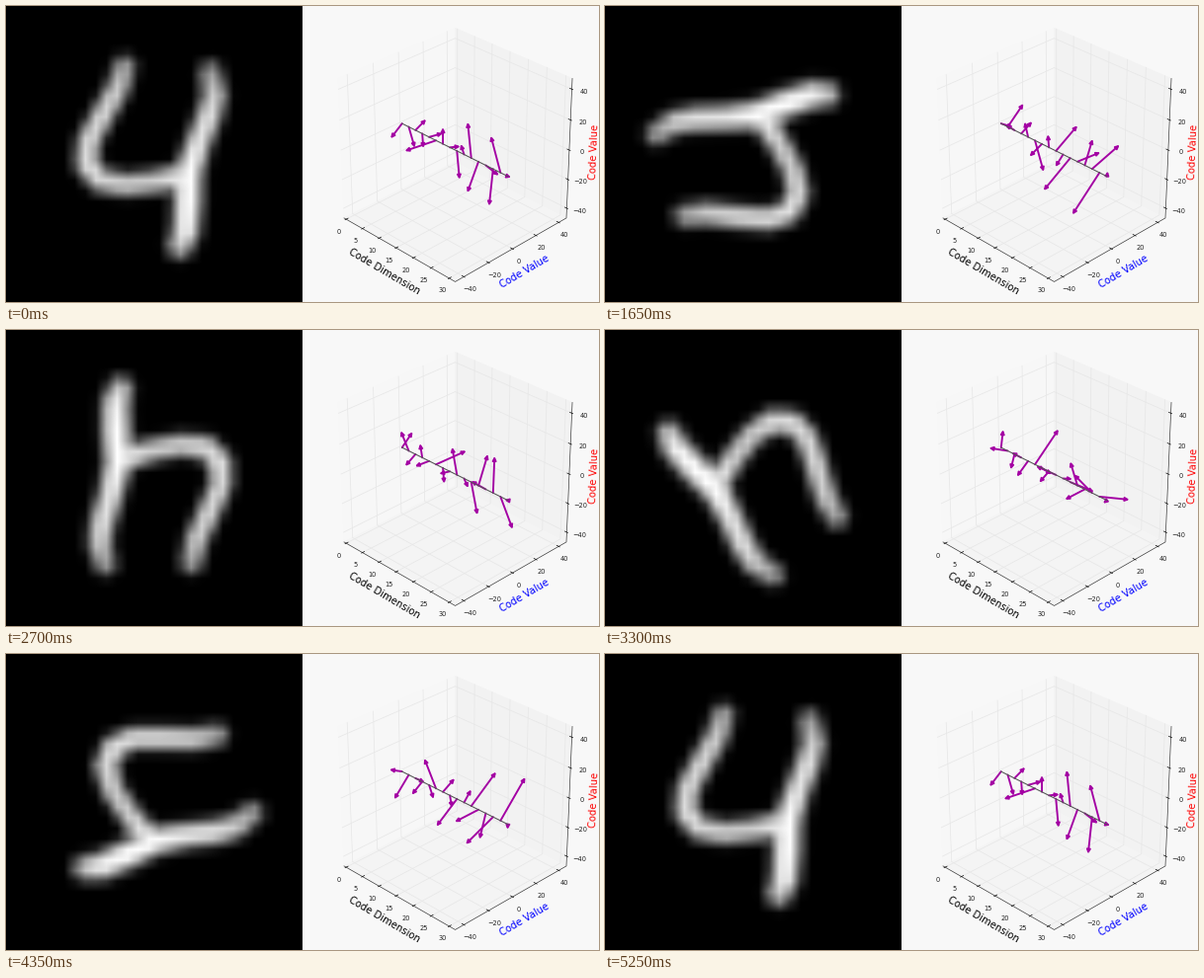
These frames come from a looping animation (600x300 px, 5400 ms). A matplotlib script:

```python
import numpy as np
import matplotlib.pyplot as plt
from matplotlib.animation import FuncAnimation
from matplotlib.patches import FancyArrowPatch, Polygon

FRAMES = 36
BACK = "#f8f8f8"
PURPLE = "#a300a3"
E = 0.5 + 1 / 48      # half size of the padded box

plt.rcParams["font.family"] = "DejaVu Sans"
fig = plt.figure(figsize=(10, 5), dpi=60, facecolor=BACK)
ax = fig.add_axes([0, 0, 1, 1])
ax.set_xlim(0, 600)
ax.set_ylim(300, 0)
ax.axis("off")

# --- 3D box seen from azimuth -45, elevation 30 ---
N = np.array([0.6124, -0.6124, 0.5])
U = np.array([0.7071, 0.7071, 0.0])
V = np.array([-0.3536, 0.3536, 0.866])


def project(p):
    p = np.asarray(p, float)
    s = 1567 / (10 - p @ N)
    return np.stack([454.5 + s * (p @ U), 146 - s * (p @ V)], axis=-1)


def line(pts, color, width, z):
    ax.plot(*project(pts).T, color=color, lw=width, zorder=z)


def dim(d):
    return d / 31 - 0.5


def val(v):
    return v / 90


def tick_label(p, dx, dy, v):
    x, y = project(p)
    text = str(v).replace("-", "\u2212")
    ax.text(x + dx, y + dy, text, size=8, color="#222222",
            ha="center", va="center_baseline")


panes = [
    ([(-E, -E, -E), (-E, E, -E), (-E, E, E), (-E, -E, E)], "#f7f7f7"),
    ([(-E, E, -E), (E, E, -E), (E, E, E), (-E, E, E)], "#f2f2f2"),
    ([(-E, -E, -E), (E, -E, -E), (E, E, -E), (-E, E, -E)], "#f4f4f4"),
]
for corners, color in panes:
    ax.add_patch(Polygon(project(corners), fc=color, ec=color, lw=0.5, zorder=1))

IN, OUT = 0.0175, 0.009
for d in range(0, 31, 5):
    x = dim(d)
    line([(x, -E, -E), (x, E, -E), (x, E, E)], "#e7e7e7", 0.9, 2)
    line([(x, -E - OUT, -E), (x, -E + IN, -E)], "k", 0.8, 4)
    tick_label((x, -E, -E), -7, 12, d)
for v in range(-40, 41, 20):
    t = val(v)
    line([(E, t, -E), (-E, t, -E), (-E, t, E)], "#e7e7e7", 0.9, 2)
    line([(-E, -E, t), (-E, E, t), (E, E, t)], "#e7e7e7", 0.9, 2)
    line([(E + OUT, t, -E), (E - IN, t, -E)], "k", 0.8, 4)
    line([(E + OUT, E, t), (E - IN, E, t)], "k", 0.8, 4)
    tick_label((E, t, -E), 6, 12, v)
    tick_label((E, E, t), 12.5, 2, v)

line([(-E, -E, -E), (E, -E, -E), (E, E, -E), (E, E, E)], "#333333", 0.8, 3)

for x, y, text, color, angle in [
    (383, 269, "Code Dimension", "k", -30.5),
    (525, 269.5, "Code Value", "b", 30.5),
    (595, 147.5, "Code Value", "r", 87.6),
]:
    ax.text(x, y, text, size=12, color=color, rotation=angle,
            ha="center", va="center", rotation_mode="default")

# --- code vectors: length and phase in degrees, one per pair of dimensions ---
LENGTH = [11.5, 17, 9.7, 10.2, 11.5, 25.3, 11, 9, 20.3, 8.5,
          25, 19.2, 16, 23.7, 28.5, 3.2]
PHASE = [214, 286, 24, 274, -10, 173, 90, -18, 276, 109,
         97, 242, -46, 263, 107, -34]

line([(dim(0), 0, 0), (dim(30), 0, 0)], "#555555", 1.3, 6)
arrows = []
for _ in LENGTH:
    a = FancyArrowPatch((0, 0), (1, 1), arrowstyle="-|>", mutation_scale=9,
                        shrinkA=0, shrinkB=0, lw=2.3, color=PURPLE, zorder=5)
    arrows.append(ax.add_patch(a))

# --- the digit: strokes as (x, y, brightness, width) knots ---
LEFT = [(120, 62, .62, 12), (113, 84, .8, 12), (97, 112, .85, 12),
        (83, 138, .85, 12), (82, 160, .88, 12.5), (95, 176, .85, 12.5),
        (120, 181, .8, 12), (150, 178, .8, 12), (180, 173, .95, 13)]
RIGHT = [(207, 68, .6, 12), (211, 90, .8, 12.5), (206, 110, .88, 13),
         (195, 138, .9, 13), (185, 168, 1, 14), (184, 200, 1, 14.5),
         (182, 228, .95, 14), (176, 243, .75, 13)]


def stroke(knots, n=90):
    k = np.array(knots, float)
    s = np.linspace(0, len(k) - 1, n)
    return np.stack([np.interp(s, np.arange(len(k)), c) for c in k.T], axis=1)


INK = np.concatenate([stroke(LEFT), stroke(RIGHT)])
cell = (np.arange(28) + 0.5) * 300 / 28
GX, GY = np.meshgrid(cell, cell)


def digit(angle):
    c, s = np.cos(angle), np.sin(angle)
    x, y = INK[:, 0] - 150, INK[:, 1] - 150
    px, py = 150 + x * c + y * s, 150 - x * s + y * c
    r = np.hypot(GX[..., None] - px, GY[..., None] - py)
    return (INK[:, 2] * np.exp(-(r / INK[:, 3]) ** 3)).max(axis=-1)


picture = ax.imshow(digit(0), cmap="gray", vmin=0, vmax=1, zorder=1,
                    extent=(0, 300, 300, 0), interpolation="bilinear",
                    aspect="auto")
ax.set_xlim(0, 600)
ax.set_ylim(300, 0)


def update(i):
    angle = 2 * np.pi * i / (FRAMES - 1)
    picture.set_data(digit(angle))
    for k, a in enumerate(arrows):
        phi = np.radians(PHASE[k]) + angle
        x = dim(2 * k)
        tip = (x, val(LENGTH[k] * np.cos(phi)), val(LENGTH[k] * np.sin(phi)))
        a.set_positions(project((x, 0, 0)), project(tip))
    return [picture, *arrows]


anim = FuncAnimation(fig, update, frames=FRAMES, interval=150,
                     repeat=True, repeat_delay=0, blit=False)
plt.show()
```
